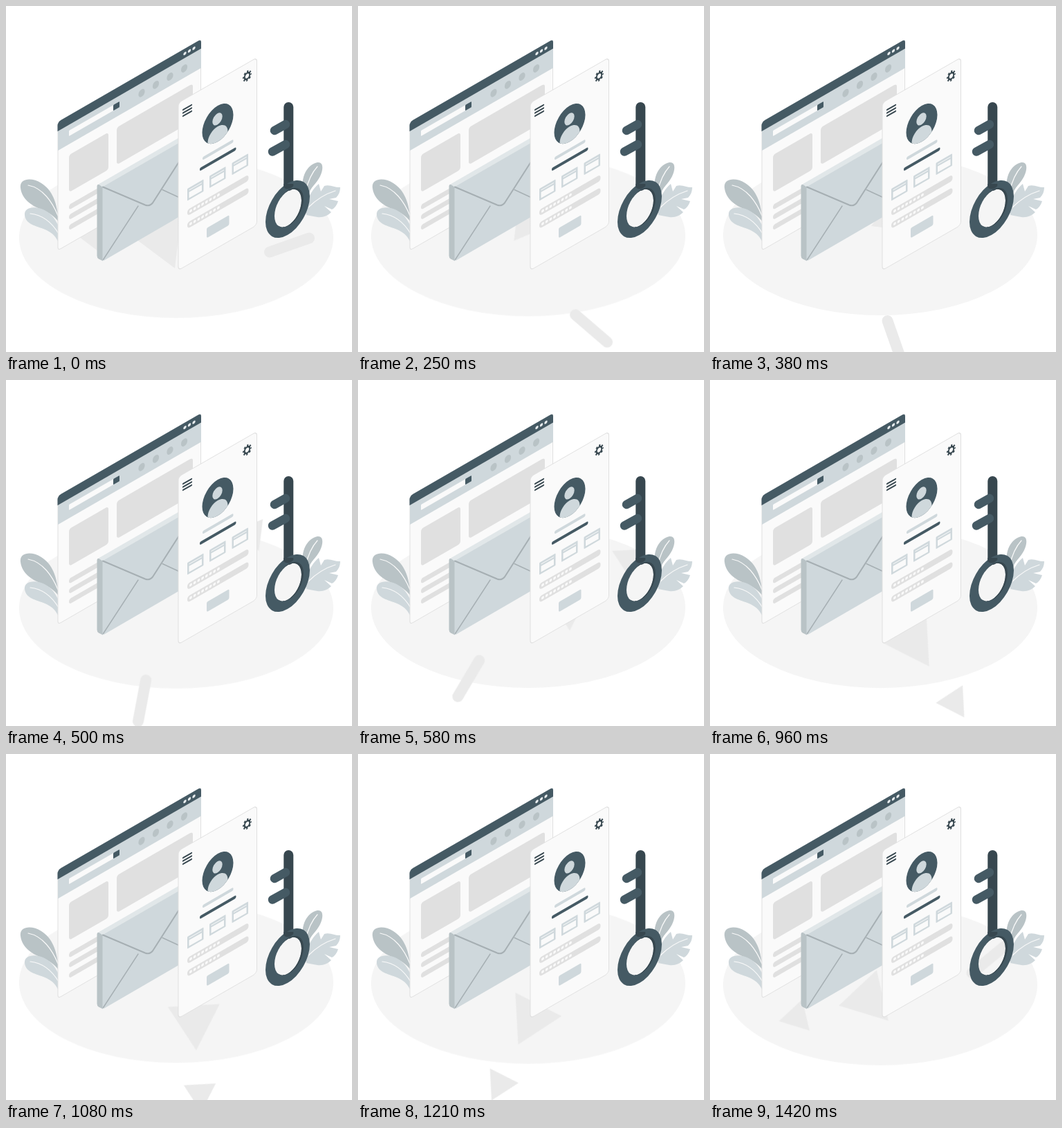
Write an HTML page that moves like this. It is 500x500 px and loops after 1.54 s.

```html
<!DOCTYPE html>
<html lang="en">
<head>
<meta charset="utf-8">
<title>Sign-in illustration</title>
<style>
  html, body { margin: 0; width: 100%; height: 100%; overflow: hidden; background: #fff; }
  svg { display: block; width: 100vw; height: 100vh; }
  .dark { fill: #455a64; }
  .deep { fill: #37474f; }
  .pale { fill: #cfd8dc; }
  .mid { fill: #b9c3c6; }
  .gray { fill: #e0e0e0; }
  .paper { fill: #fafafa; }
  .sheet { fill: #fafafa; stroke: #e0e0e0; }
  .line { fill: none; stroke-linecap: round; stroke-linejoin: round; }
  .vein { fill: none; stroke: #fafafa; stroke-width: 1.2; stroke-linecap: round; }

  /* 37 pictures per loop, ten degrees apart */
  #floor, #shadows { animation: turn 1540ms steps(37) -4ms infinite; }
  #shadows { transform-origin: 269px 343px; fill: #eaeaea; }
  #floor { fill: #f5f5f5; animation-name: bob; animation-timing-function: linear; }
  @keyframes turn { to { transform: rotate(370deg); } }
  @keyframes bob { 50% { transform: translateY(-8px); } }
</style>
</head>
<body>
<svg viewBox="0 0 500 500">
  <defs>
    <clipPath id="face"><ellipse cx="57" cy="63" rx="22.5" ry="26"/></clipPath>
    <g id="box">
      <rect class="pale" width="23.5" height="17.5" rx="1"/>
      <path class="line" stroke="#fafafa" d="M3 3.5H20.5"/>
      <rect class="paper" x="2.5" y="6.5" width="18.5" height="8.5"/>
    </g>
    <g id="field">
      <rect class="gray" width="88.5" height="9" rx="4"/>
      <path class="line" stroke="#fafafa" stroke-width="4" stroke-dasharray="0 5.7" d="M5 4.5H46"/>
    </g>
  </defs>

  <ellipse id="floor" cx="246" cy="335" rx="227" ry="116"/>

  <g id="shadows">
    <path class="line" stroke="#eaeaea" stroke-width="16" d="M381 355.5L438 335.5"/>
    <path d="M137.5 307.5L132 353.5L95 325.5Z"/>
    <path d="M253 304.5L244 379L184 334Z"/>
  </g>

  <g id="leaves">
    <path class="mid" d="M21 263C19 249 37 247 51 256C67 266 74 284 76 312C69 303 63 299 51 294C36 288 23 279 21 263Z"/>
    <path class="vein" d="M32 259C53 263 67 283 75 303"/>
    <path class="pale" d="M27 302C26 292 38 289 51 293C63 297 70 306 76 318V342C71 331 66 327 54 322C40 317 28 314 27 302Z"/>
    <path class="vein" d="M35 300C54 302 67 314 76 329"/>
    <path class="mid" d="M429 262C427 245 436 229 450 226C460 225 458 238 454 246C448 258 441 260 437 273L432 276Z"/>
    <path class="vein" d="M450 232C440 243 436 255 433 268"/>
    <path class="pale" d="M434 284C438 274 445 262 452 257L455 268L460 260C468 257 476 263 483 262C483 268 481 273 477 277L467 279L480 282C478 288 475 292 471 294L460 289L470 298C465 303 458 306 450 305C444 304 439 303 434 302Z"/>
    <path class="vein" d="M476 267C460 272 448 280 437 291"/>
  </g>

  <g id="window" transform="matrix(1 -.577 0 1 75 170)">
    <rect class="sheet" y="-2" width="206.5" height="185" rx="4"/>
    <path class="pale" d="M0 11H207V39H0Z"/>
    <path class="dark" d="M-.5 11V3Q-.5 -2.500 5 -2.500H203Q207 -2.500 207 2V11Z"/>
    <path class="line" stroke="#e8edef" stroke-width="4.4" stroke-dasharray="0 6.5" d="M183.5 4.5H197"/>
    <rect class="paper" x="16" y="19.3" width="65" height="8" rx="1"/>
    <rect class="dark" x="80" y="19.3" width="9" height="8.2" rx="1"/>
    <g class="mid">
      <ellipse cx="121" cy="25.5" rx="4.6" ry="5.3"/>
      <ellipse cx="141.5" cy="25.5" rx="4.6" ry="5.3"/>
      <ellipse cx="162" cy="25.5" rx="4.6" ry="5.3"/>
      <ellipse cx="182.5" cy="25.5" rx="4.6" ry="5.3"/>
    </g>
    <g class="gray">
      <rect x="16" y="54.5" width="57" height="54" rx="4"/>
      <rect x="85" y="54.5" width="110" height="54" rx="4"/>
      <rect x="16" y="126.5" width="70" height="7.5" rx="3.5"/>
      <rect x="16" y="141" width="70" height="7.5" rx="3.5"/>
      <rect x="16" y="156" width="70" height="7.5" rx="3.5"/>
    </g>
  </g>

  <g id="envelope">
    <path fill="#e1e7e9" d="M132 258.5L254 188V198L140 264Z"/>
    <path class="mid" d="M131.5 261Q131.5 257 135 258.5L140 262V368.5L134 365.5Q131.5 364 131.5 361Z"/>
    <path class="pale" d="M139.5 261.5L254 195.5V302.5L142 367.5Q139.5 368.5 139.5 366Z"/>
    <g class="line" stroke="#a6afb3">
      <path stroke-width="1.4" d="M140.5 366.5L191 289M226 265.5L252 277.5"/>
      <path stroke-width="2" d="M140 261.5L201 287.5Q207.5 290 212 284.5L252 222"/>
    </g>
  </g>

  <g id="card" transform="matrix(1 -.577 0 1 249 140)">
    <rect class="sheet" width="113.5" height="242" rx="5"/>
    <path class="line" stroke="#37474f" stroke-width="2.2" d="M7 14H19M7 18.5H19M7 23H19"/>
    <g transform="translate(99.5 18.5) scale(.866 1)" fill="none" stroke="#37474f">
      <circle r="4.4" stroke-width="2.4"/>
      <circle r="6.2" stroke-width="2.6" stroke-dasharray="2.435" stroke-dashoffset="1.2"/>
    </g>
    <g clip-path="url(#face)">
      <rect class="dark" x="30" y="30" width="60" height="64"/>
      <ellipse class="pale" cx="56.5" cy="56" rx="7.2" ry="8.2"/>
      <ellipse class="pale" cx="57" cy="82" rx="14.5" ry="15"/>
    </g>
    <rect class="pale" x="35" y="98.5" width="44.5" height="4.5" rx="2"/>
    <rect class="dark" x="31" y="112" width="52.5" height="4.5" rx="2"/>
    <use href="#box" x="13" y="131.5"/>
    <use href="#box" x="45" y="131.5"/>
    <use href="#box" x="77.5" y="131.5"/>
    <use href="#field" x="13" y="162"/>
    <use href="#field" x="13" y="180.5"/>
    <rect class="pale" x="41" y="204.5" width="32.5" height="14.5" rx="2"/>
  </g>

  <g id="key">
    <g class="line" stroke="#455a64" stroke-width="12.5">
      <path stroke="#37474f" stroke-width="14" d="M408.300 146V260"/>
      <path d="M388 180L404 171M385 210.500L404 200"/>
    </g>
    <g transform="matrix(1 -.577 0 1 407 293.500)" fill-rule="evenodd">
      <path class="dark" d="M-32 0a32 37.300 0 1 0 64 0a32 37.300 0 1 0 -64 0ZM-19 -1a19.500 25 0 1 0 39 0a19.500 25 0 1 0 -39 0Z"/>
      <path class="deep" d="M-19 -1a21 26 0 1 0 42 0a21 26 0 1 0 -42 0ZM-19 -1a19.500 25 0 1 0 39 0a19.500 25 0 1 0 -39 0Z"/>
    </g>
    <path class="deep" d="M401.300 257H415.300V260Q408 268 401.300 262Z"/>
  </g>
</svg>
</body>
</html>
```
